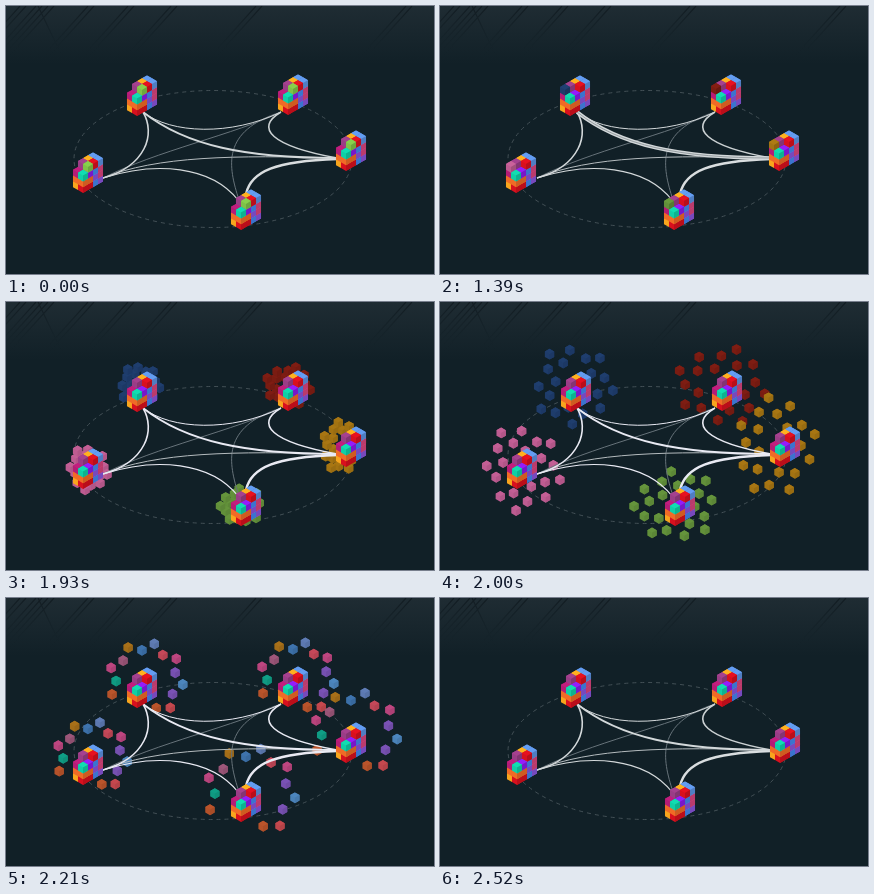
Animation of 428x268 px, one loop 2890 ms. Source, as an HTML page with a canvas:

```html
<!DOCTYPE html>
<html lang="en">
<head>
<meta charset="utf-8">
<title>Cube exchange</title>
<style>
html, body { margin: 0; width: 100%; height: 100%; overflow: hidden; background: #112027; }
canvas { display: block; width: 428px; height: 268px; }
</style>
</head>
<body>
<canvas id="stage"></canvas>
<script>
const W = 428, H = 268, LOOP = 2890;
const GOLDEN = Math.PI * (3 - Math.sqrt(5));
const canvas = document.getElementById('stage');
const dpr = window.devicePixelRatio || 1;
canvas.width = W * dpr;
canvas.height = H * dpr;
const ctx = canvas.getContext('2d');
ctx.scale(dpr, dpr);

// burst: centre offset and radii of the outgoing swarm; fit: size of the returning one
const clusters = [
  { x: 136, y: 90, color: '#1e3c6b', burst: [-2, -7, 40, 42], fit: 1 },
  { x: 287, y: 89, color: '#7a1c12', burst: [-4, -5, 47, 40], fit: 1 },
  { x: 345, y: 145, color: '#a37312', burst: [-9, 0, 42, 50], fit: 1.13 },
  { x: 240, y: 204, color: '#62903a', burst: [-5, 0, 42, 37], fit: 1.2 },
  { x: 82, y: 167, color: '#bd5c91', burst: [0, 0, 39, 44], fit: 0.96 }
];

const palette = {
  R: '#d8101e', O: '#f06b26', Y: '#f8a51d', M: '#b51c76', K: '#d8457d', V: '#8c1bea',
  U: '#8a55dc', B: '#4587ee', L: '#5d93e2', P: '#9a3d86', T: '#10cfa6', G: '#7fc247'
};

// Four levels from the bottom; each row runs from the far end to the near end.
// "*" is the home-coloured cube, "G" the green one, "." is empty.
const levels = [
  ['UUUY', 'UBRR'],
  ['UUUO', 'KUOO'],
  ['UUUM', 'KBVT'],
  ['LYP*', 'LRG.']
];

// Colours around the returning arc, clockwise from the left
const arc = ['#b5522a', '#0f9a82', '#b8447c', '#985476', '#a36d18', '#3c70a8', '#5c78b0',
  '#bf4656', '#b8447c', '#7650b0', '#4a82b8', '#7650b0', '#bf464c', '#b5522a'];

const links = [
  ['M275 106C215 125 222 160 233 194', 1, '#67737a'],
  ['M275 106C230 128 150 145 97 172', 1, '#67737a'],
  ['M97 172C150 150 230 149 331 152', 1, '#b4bbbe'],
  ['M137 106C165 128 225 130 275 106', 1, '#d3d8da'],
  ['M97 172C150 155 205 160 232 194', 1.1, '#d3d8da'],
  ['M137 106C150 128 140 160 97 172', 1.6, '#d3d8da'],
  ['M275 106C248 122 265 140 331 152', 1.6, '#cbd1d3'],
  ['M331 153C270 155 245 165 240 188', 2.5, '#d9dddf'],
  ['M137 106C180 140 240 152 331 152', 1.8, '#d3d8da']
].map(([d, width, color]) => ({ path: new Path2D(d), width, color }));

// out: spread of home-coloured cubes; hollow: how far they form a ring; back: spread of mixed cubes
const steps = [
  { at: 0, green: true },
  { at: 850, green: true, fresh: true },
  { at: 1390, fresh: true },
  { at: 1930, out: 0.5, hollow: 0 },
  { at: 2000, out: 1, hollow: 0 },
  { at: 2070, out: 1.4, hollow: 0.6, back: 1.5 },
  { at: 2210, back: 1 },
  { at: 2280, back: 0.62 },
  { at: 2350, back: 0.28 },
  { at: 2520 }
];

function shade(hex, k) {
  const n = parseInt(hex.slice(1), 16);
  const part = s => Math.min(255, Math.round((n >> s & 255) * k));
  return `rgb(${part(16)},${part(8)},${part(0)})`;
}

function face(color, points) {
  ctx.fillStyle = color;
  ctx.beginPath();
  points.forEach(([x, y]) => ctx.lineTo(x, y));
  ctx.closePath();
  ctx.fill();
}

function cube(x, y, r, color, depth) {
  const w = r * 0.866, h = r / 2;
  face(color, [[x, y - r], [x + w, y - h], [x + w, y + h], [x, y + r], [x - w, y + h], [x - w, y - h]]);
  face(shade(color, 1 + depth / 2), [[x, y - r], [x + w, y - h], [x, y], [x - w, y - h]]);
  face(shade(color, 1 - depth), [[x, y], [x + w, y - h], [x + w, y + h], [x, y + r]]);
}

function block(c, step) {
  const x0 = c.x - 5 - (step.fresh ? 1 : 0), y0 = c.y + 20;
  for (let row = 0; row < 2; row++) {
    for (let col = 0; col < 4; col++) {
      levels.forEach((rows, level) => {
        const key = rows[row][col];
        if (key === '.' || key === '*' && !step.fresh || key === 'G' && !step.green) return;
        const right = 3 - col, left = 1 - row;
        const x = x0 + 5 * (right - left);
        const y = y0 - 5.8 * (level + 1) - 2.9 * (right + left);
        cube(x, y, 5.8, palette[key] || c.color, 0.14);
      });
    }
  }
}

// Sunflower spread that opens into a ring
function outgoing(c, seed, { out, hollow }) {
  const [dx, dy, rx, ry] = c.burst, count = 23;
  for (let i = 3; i < count; i++) {
    const r = out * (hollow + (1 - hollow) * Math.sqrt((i + 1) / count));
    const a = i * GOLDEN + seed;
    cube(c.x + dx + rx * r * Math.cos(a), c.y + dy + ry * r * Math.sin(a), 5.4, c.color, 0.06);
  }
}

// Zigzag arc of mixed colours, open at the lower left
function returning(c, spread) {
  const k = spread * c.fit;
  arc.forEach((color, i) => {
    const a = (157 + 21 * i) * Math.PI / 180;
    const r = i % 2 ? 30 : 37;
    cube(c.x + k * (4 + r * Math.cos(a)), c.y + k * (r * Math.sin(a) - 8), 5.4, color, 0.06);
  });
}

function backdrop() {
  ctx.fillStyle = '#112027';
  ctx.fillRect(0, 0, W, H);
  const glow = ctx.createLinearGradient(0, 0, 0, 58);
  glow.addColorStop(0, '#1f2c33');
  glow.addColorStop(1, '#112027');
  ctx.fillStyle = glow;
  ctx.fillRect(0, 0, W, 58);

  const fade = ctx.createLinearGradient(0, 0, 0, 50);
  fade.addColorStop(0, '#121c22');
  fade.addColorStop(1, 'rgba(17,32,39,0)');
  ctx.strokeStyle = fade;
  ctx.lineWidth = 1.2;
  ctx.beginPath();
  for (const x of [14, 30, 42, 82, 122, 165, 250, 400]) {
    for (const gap of [0, 6]) {
      ctx.moveTo(x + gap, 0);
      ctx.lineTo(x + gap - 45, 50);
    }
  }
  ctx.moveTo(32, 0);
  ctx.lineTo(55, 48);
  ctx.stroke();
}

function orbit() {
  ctx.strokeStyle = '#435056';
  ctx.lineWidth = 1;
  ctx.setLineDash([4, 4]);
  ctx.beginPath();
  ctx.ellipse(207, 153, 139, 68.5, 0, 0, Math.PI * 2);
  ctx.stroke();
  ctx.setLineDash([]);
}

function wires(step) {
  const busy = step.out || step.back;
  links.forEach(({ path, width, color }, i) => {
    const doubled = step.fresh && i === links.length - 1;
    ctx.lineWidth = doubled ? 3.6 : width;
    ctx.strokeStyle = busy && i > 2 ? '#e9eaf3' : color;
    ctx.stroke(path);
    if (doubled) {
      ctx.lineWidth = 0.7;
      ctx.strokeStyle = '#7b8589';
      ctx.stroke(path);
    }
  });
}

function draw(step) {
  backdrop();
  orbit();
  if (step.out) clusters.forEach((c, i) => outgoing(c, i, step));
  if (step.back) clusters.forEach(c => returning(c, step.back));
  wires(step);
  clusters.forEach(c => block(c, step));
}

const start = performance.now();
function tick() {
  const t = (performance.now() - start) % LOOP;
  draw(steps.filter(s => s.at <= t).pop());
  requestAnimationFrame(tick);
}
tick();
</script>
</body>
</html>
```
